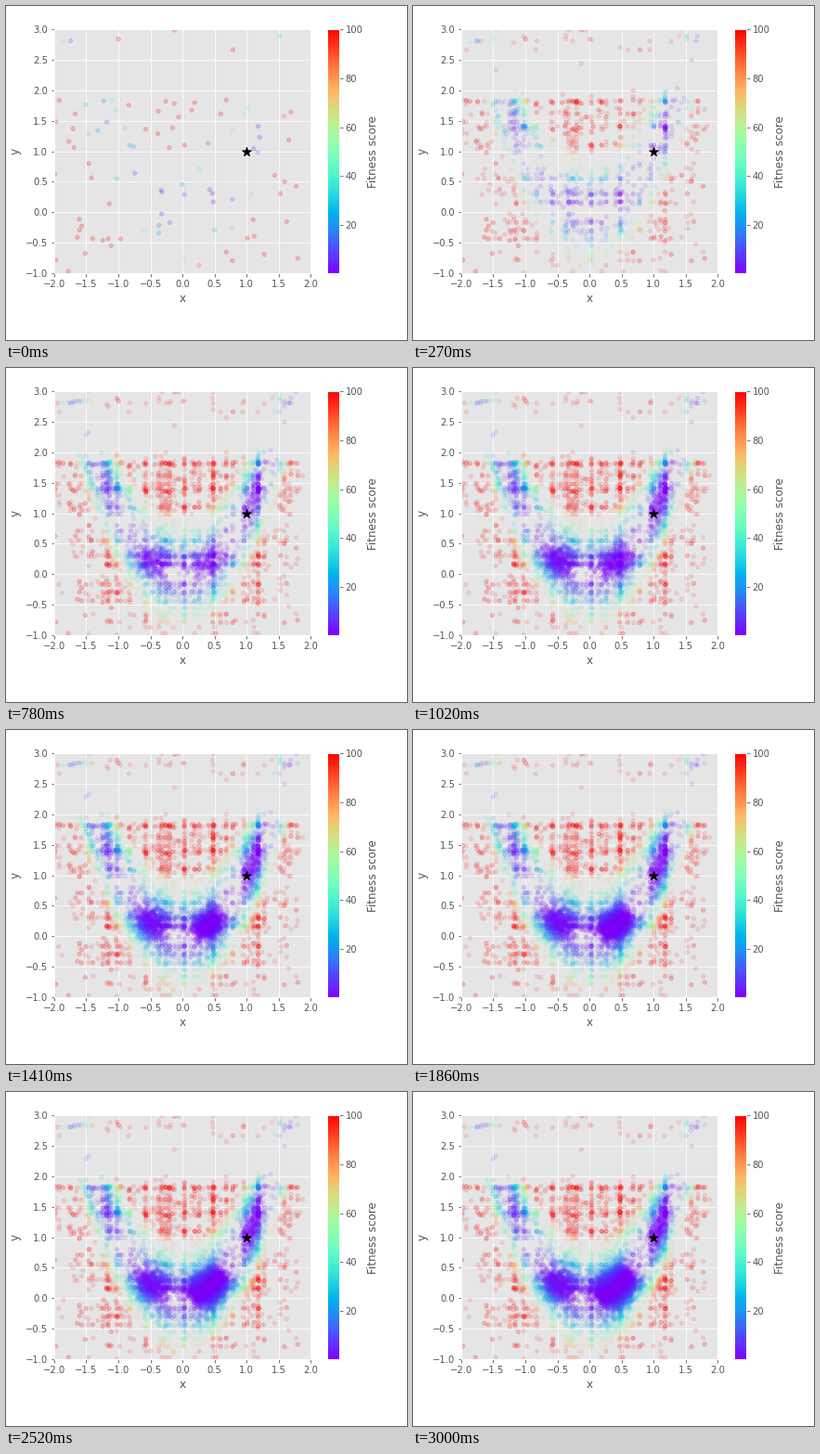
A matplotlib script for the animation above (3030 ms loop, 432 by 360 pixels).

```python
import numpy as np
import matplotlib.pyplot as plt
from matplotlib.animation import FuncAnimation
from matplotlib.cm import ScalarMappable
from matplotlib.colors import Normalize

GENERATIONS = 101
POP = 125

# Fittest founders, strongest first; the rest of the population is random
ELITE = np.array([
    (1.18, 1.41), (0.48, 0.17), (-0.26, 1.82), (-1.18, 1.48), (0.03, 0.29),
    (-1.02, 0.55), (-0.57, 1.36), (0.19, 1.80), (-0.20, -0.17), (0.96, 1.62),
    (-1.14, 0.14), (0.50, -0.29), (-0.82, 1.10), (-0.32, 0.33), (0.03, 1.10),
    (0.26, 0.71),
])

rng = np.random.default_rng(12)


def score(p):
    x, y = p.T
    return (1 - x) ** 2 + 100 * (y - x ** 2) ** 2


strays = rng.uniform((-2, -1), (2, 2), (80, 2))
strays[::12, 1] += 1
founders = np.vstack([ELITE, strays])
rank = 1 / (np.arange(len(founders)) + 4)
rank /= rank.sum()


def lattice(n):
    """Children that take x from one founder and y from another."""
    x = rng.choice(founders[:, 0], n, p=rank)
    y = rng.choice(founders[:, 1], n, p=rank)
    mutated = rng.random((n, 2)) < 0.22
    return np.column_stack([x, y]) + mutated * rng.normal(0, 0.16, (n, 2))


def clouds(n, g):
    """Children of the groups that gather along the valley."""
    early = np.clip((42 - g) / 10, 0, 1)
    spread = 0.15 if g < 35 else min(0.075 + 0.0015 * (g - 35), 0.14)
    p_left, p_up = 0.03 + 0.42 * early, 0.03 + 0.17 * early
    group = rng.choice(3, n, p=[p_left, p_up, 1 - p_left - p_up])
    center = np.array([(-0.52, 0.22), (1.08, 1.1), (0.41, 0.19)])[group]
    size = np.array([(0.14, 0.17), (0.09, 0.30), (spread, spread)])[group]
    p = rng.normal(center, size)
    # Crossover and mutation carry some children off along one axis
    crossed = rng.random(n) < 0.2
    p[crossed, 1] = rng.permutation(p[crossed, 1])
    mutated = rng.random((n, 2)) < (0.09, 0.13)
    return p + mutated * rng.normal(0, 0.38, (n, 2))


def generation(g):
    if g == 0:
        return np.vstack([founders, founders])
    n = 3 * POP
    share = np.clip((g - 10) / 28, 0, 0.96)
    settled = rng.random((n, 1)) < share
    p = np.where(settled, clouds(n, g), lattice(n))
    limit = 200 * np.exp(-g / 14) + 10
    w = 1 / (1 + score(p) / limit) + 0.01
    return p[rng.choice(n, POP, replace=False, p=w / w.sum())]


history = [generation(g) for g in range(GENERATIONS)]
ends = np.cumsum([len(h) for h in history])
points = np.vstack(history)
values = score(points)

plt.style.use("ggplot")
fig, ax = plt.subplots(figsize=(6, 5), dpi=72, facecolor="white")
fig.subplots_adjust(left=0.12, right=0.92, bottom=0.2, top=0.93)
norm = Normalize(0.3, 100)
bar = fig.colorbar(ScalarMappable(norm, "rainbow"), ax=ax, fraction=0.15,
                   pad=0.05, aspect=20, ticks=range(20, 101, 20))
bar.set_label("Fitness score")

ax.set(xlim=(-2, 2), ylim=(-1, 3), xlabel="x", ylabel="y",
       xticks=np.arange(-2, 2.1, 0.5), yticks=np.arange(-1, 3.1, 0.5))
dots = ax.scatter([], [], c=[], s=18, linewidths=1, alpha=0.1,
                  cmap="rainbow", norm=norm, edgecolors="face", zorder=2)
ax.scatter([1], [1], s=100, c="black", marker="*", linewidths=1, zorder=3)


def update(g):
    dots.set_offsets(points[:ends[g]])
    dots.set_array(values[:ends[g]])
    return dots,


anim = FuncAnimation(fig, update, frames=GENERATIONS, interval=30,
                     repeat=True, repeat_delay=0)
plt.show()
```
